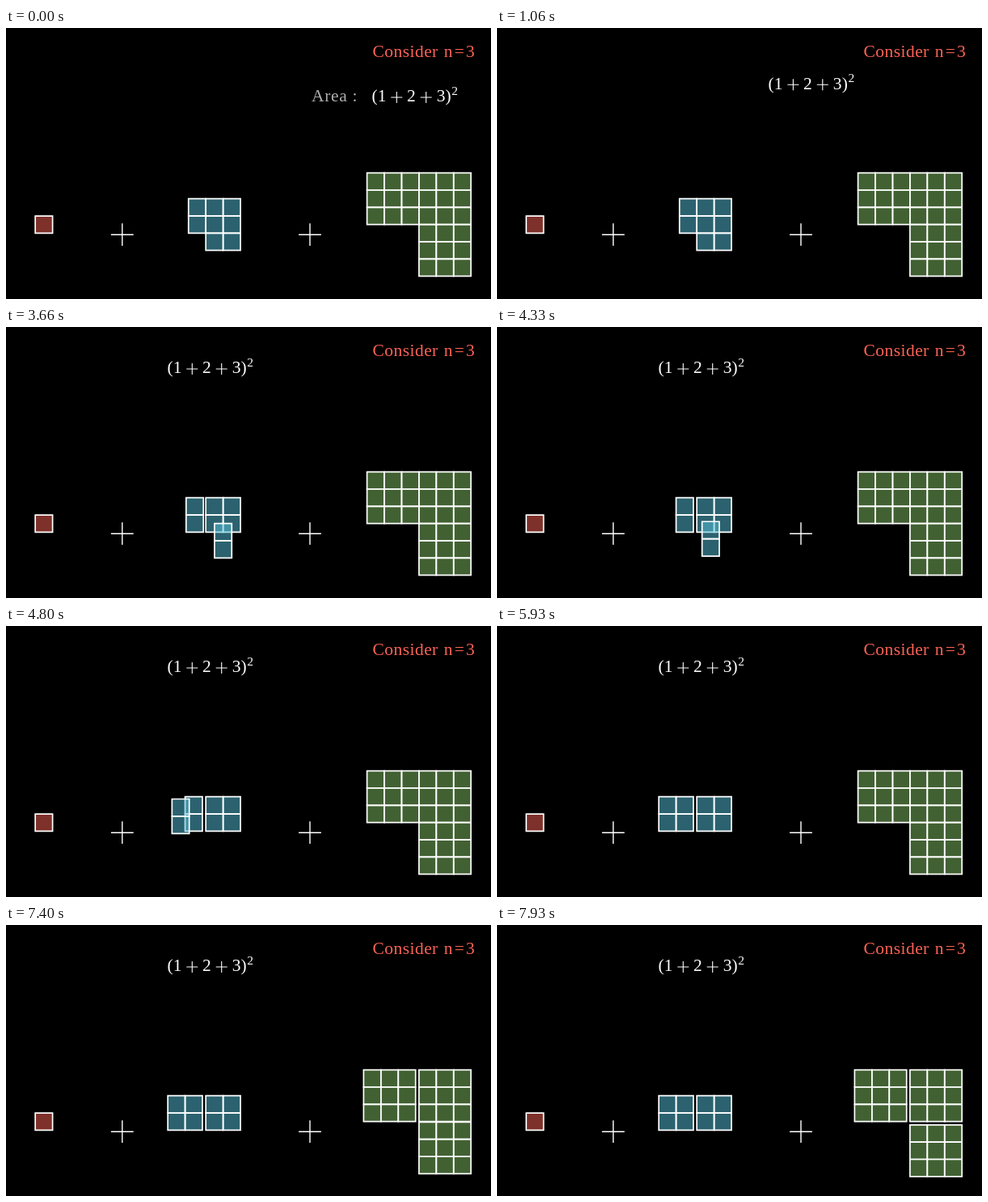
An HTML page for the animation above (8 s loop, 600 by 336 pixels).

```html
<!DOCTYPE html>
<html lang="en">
<head>
<meta charset="utf-8">
<title>Sum of cubes</title>
<style>
  html, body { margin: 0; width: 100%; height: 100%; overflow: hidden; background: #000; }
  svg { display: block; width: 600px; height: 336px; }
  text { font: 21.5px "Liberation Serif", "Noto Serif", serif; fill: #fff; }
  .mid { text-anchor: middle; }
  .line { stroke: #fff; fill: none; }
  .cell { stroke: #fff; stroke-width: 1.7; fill-opacity: .5; vector-effect: non-scaling-stroke; }
</style>
</head>
<body>
<svg id="stage" viewBox="0 0 600 336" xmlns="http://www.w3.org/2000/svg"></svg>
<script>
const LOOP = 8000;
const W = 21.43, H = 21.34, CY = 243.7, GAP = 4.2;
const RED = '#fc6255', BLUE = '#58c4dd', GREEN = '#83c167';
const stage = document.getElementById('stage');

function add(parent, tag, attrs = {}, content = '') {
  const el = document.createElementNS('http://www.w3.org/2000/svg', tag);
  for (const key in attrs) el.setAttribute(key, attrs[key]);
  el.textContent = content;
  parent.append(el);
  return el;
}

function label(parent, x, y, content, style = '', cls = '') {
  return add(parent, 'text', { x, y, style, class: cls }, content);
}

function plus(parent, x, y, r, width) {
  add(parent, 'path', {
    d: `M${x - r} ${y}h${2 * r}M${x} ${y - r}v${2 * r}`,
    class: 'line', 'stroke-width': width
  });
}

function block(x, y, cols, rows, fill) {
  const g = add(stage, 'g');
  for (let r = 0; r < rows; r++)
    for (let c = 0; c < cols; c++)
      add(g, 'rect', { x: x + c * W, y: y + r * H, width: W, height: H, fill, class: 'cell' });
  return g;
}

// Sigmoid ease, normalised to run from 0 to 1
function smooth(t) {
  const sig = v => 1 / (1 + Math.exp(-v));
  const e = sig(-5);
  return Math.min(1, Math.max(0, (sig(10 * (t - 0.5)) - e) / (1 - 2 * e)));
}
const ease = (t, start) => smooth(Math.min(1, Math.max(0, (t - start) / 1000)));
const move = (el, x, y) => el.setAttribute('transform', `translate(${x} ${y})`);

// Headings
label(stage, 453.5, 36.3, 'Consider', `fill:${RED};letter-spacing:.45px`);
label(stage, 541.7, 36.3, 'n=3', `fill:${RED};letter-spacing:2.2px`);
const area = add(stage, 'g');
label(area, 378, 91.3, 'Area', 'letter-spacing:.7px');
label(area, 428.5, 91.3, ':');

// Formula, laid out from its own left edge and baseline
const formula = add(stage, 'g');
[['(', 5], ['1', 14], ['2', 50.4], ['3', 87], [')', 96.2]]
  .forEach(([s, x]) => label(formula, x, 0, s, '', 'mid'));
label(formula, 104.2, -8.3, '2', 'font-size:15.5px', 'mid');
plus(formula, 32.3, -5.3, 7, 1.1);
plus(formula, 68.7, -5.3, 7, 1.1);

// Shapes
plus(stage, 143.8, 256.2, 13.9, 1.4);
plus(stage, 376, 256.2, 13.9, 1.4);

const blueX = 257.9 - 1.5 * W, blueY = CY - 1.5 * H;
const greenX = 510.9 - 3 * W, greenY = CY - 3 * H;
block(46.9 - W / 2, CY - H / 2, 1, 1, RED);
const blueCol = block(blueX, blueY, 1, 2, BLUE);
block(blueX + W, blueY, 2, 2, BLUE);
const pair = block(-W, -H / 2, 2, 1, BLUE);
const greenLeft = block(greenX, greenY, 3, 3, GREEN);
block(greenX + 3 * W, greenY, 3, 3, GREEN);
const greenLow = block(greenX + 3 * W, CY, 3, 3, GREEN);

function draw(t) {
  area.setAttribute('opacity', 1 - ease(t, -424));
  const f = ease(t, 576);
  move(formula, 451 - 253 * f, 91.3 - 34 * f);

  // The pair turns by straight blending of its corners, then slides to the left
  const turn = ease(t, 2576), slide = ease(t, 4076), keep = 1 - turn;
  const x = blueX + 2 * W - slide * (2.5 * W + GAP);
  const y = blueY + 2.5 * H - slide * 1.5 * H;
  pair.setAttribute('transform', `matrix(${keep} ${-turn} ${turn} ${keep} ${x} ${y})`);

  move(blueCol, -GAP * ease(t, 3076), 0);
  move(greenLeft, -GAP * ease(t, 6076), 0);
  move(greenLow, 0, GAP * ease(t, 7076));
}

const begin = performance.now();
function tick() {
  draw((performance.now() - begin) % LOOP);
  requestAnimationFrame(tick);
}
draw(0);
requestAnimationFrame(tick);
</script>
</body>
</html>
```
